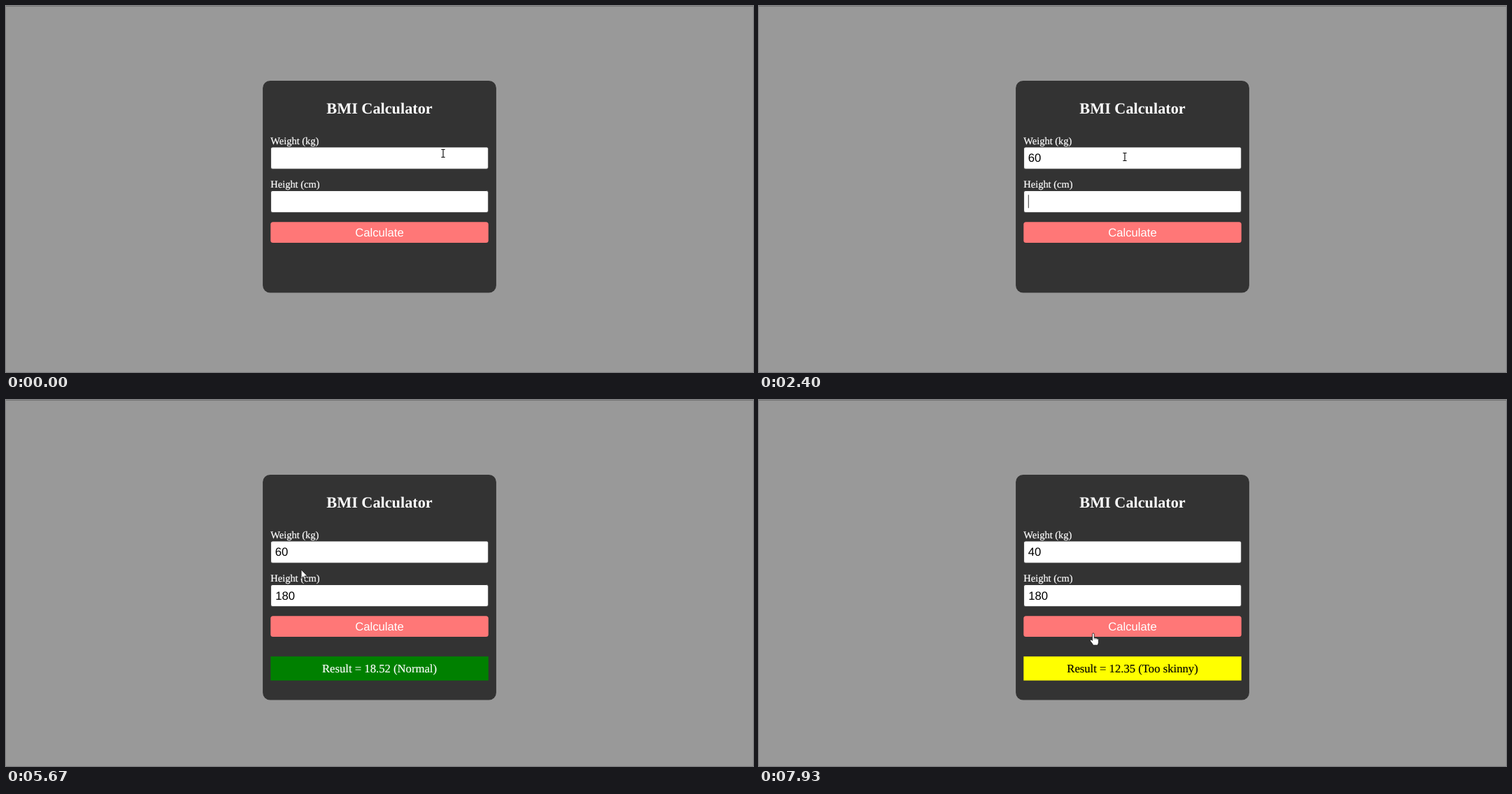
An HTML page for the animation above (8 s loop, 1068x524 px).

```html
<!DOCTYPE html>
<html lang="en">
<head>
<meta charset="utf-8">
<title>BMI Calculator</title>
<style>
  html, body { margin: 0; width: 100%; height: 100%; overflow: hidden; background: #999; }
  svg { display: block; width: 1068px; height: 524px; }
  text { text-rendering: geometricPrecision; white-space: pre; }
  .serif { font-family: "Liberation Serif", "Times New Roman", serif; fill: #fff; }
  .sans { font: 16.68px "Liberation Sans", Arial, sans-serif; }
  .title { font-size: 22.24px; font-weight: bold; }
  .label { font-size: 14.46px; stroke: #fff; stroke-width: .2px; }
  .result { font-size: 16.68px; stroke-width: .15px; }
  .item { font: 8.34px "Open Sans", "Noto Sans", sans-serif; fill: #555; }
  .mid { text-anchor: middle; }
</style>
</head>
<body>
<svg viewBox="0 0 1068 524">
  <defs>
    <g id="field">
      <rect x="378.3" y="-15.7" width="311.3" height="31.5" rx="3" fill="#767676"/>
      <path d="M378.7 14V-13q0-2.4 2.4-2.4H687" fill="none" stroke="#292929" stroke-width=".8"/>
      <rect x="379.1" y="-15.1" width="309.8" height="30.1" rx="2" fill="#fff"/>
    </g>
  </defs>
  <rect width="1068" height="524" fill="#999"/>
  <rect width="1068" height="1" fill="#777"/>
  <rect id="card" x="367.1" y="107" width="333.8" rx="10.5" fill="#333"/>
  <text class="serif title mid" x="534" y="153.8">BMI Calculator</text>
  <text class="serif label" x="378.3" y="198">Weight (kg)</text>
  <text class="serif label" x="378.3" y="260.3">Height (cm)</text>
  <use href="#field" y="217.7"/>
  <use href="#field" y="280"/>
  <rect id="mark" y="208" height="19" fill="#3297fd"/>
  <text id="weight" class="sans" x="384.8" y="223.3"></text>
  <text id="height" class="sans" x="385.3" y="285.6"></text>
  <rect id="caret" width="0.9" height="19" fill="#222"/>
  <rect x="378.3" y="309.3" width="311.4" height="29.8" rx="3.5" fill="#f77"/>
  <text class="sans mid" x="534" y="330" fill="#fff">Calculate</text>
  <g id="result">
    <rect id="band" x="378.3" y="367.2" width="311.4" height="34.4"/>
    <text id="verdict" class="serif result mid" x="534" y="390.2"></text>
  </g>
  <g id="popup">
    <path id="bubble" fill="#fff"/>
    <g id="items"></g>
  </g>
  <g id="cursor">
    <path id="beam" d="M-2.6-5.5h2L0-5 .6-5.5h2M0-5V5M-2.6 5.5h2L0 5 .6 5.5h2" fill="none" stroke="#000" stroke-width="1.1"/>
    <g id="hand" transform="scale(1.1)" fill="#fff" stroke="#111" stroke-width=".7" stroke-linejoin="round">
      <path d="M-1.3 9.5V1.1a1.2 1.2 0 0 1 2.4 0V5.7l4 .8q1.7.4 1.7 2.1v2.8q0 1.6-.8 3v1.1H-.7v-1.1l-3.2-4.3q-.7-1.1.2-1.7.9-.4 1.6.4z"/>
      <path d="M1.1 5.7v2.4M3.1 6.1v2M5 6.5v1.9" fill="none" stroke-width=".5"/>
    </g>
    <path id="arrow" d="M0 0V12.4L2.8 9.8 4.7 14.2 6.6 13.4 4.7 9.1H8.6Z" fill="#fff" stroke="#111" stroke-width=".7"/>
  </g>
</svg>
<script>
// All times are in ticks of 1/15 s.
const TICK = 1000 / 15, TICKS = 120, BLINK = 8;
const DIGIT = 9.28, TEXT_X = 385, ROW_Y = [217.5, 279.8];
const HISTORY = [["60", "23", "12", "80", "50", "500"], ["180", "170", "160", "150"]];

const moves = [ // from, to, x, y
  [0, 2, 561, 213], [3, 9, 522, 221], [14, 16, 523, 216], [62, 65, 554, 268],
  [66, 73, 471, 317], [79, 88, 405, 217], [90, 95, 382, 218],
  [100, 104, 471, 287], [104, 109, 479, 353], [109, 114, 478, 334]
];

// Focus, typing and blur; row is the focused field, open allows suggestions.
const type = (at, row, text) => ({ at, row, text, open: true });
const events = [
  { at: 0 },
  type(13, 0, ""), type(28, 0, "6"), type(32, 0, "60"),
  { at: 36, row: 1, text: "" },
  type(46, 1, "1"), type(54, 1, "18"), type(55, 1, "180"),
  { at: 73 },
  { at: 90, row: 0, text: "60", drag: true },
  type(106, 0, "4"), type(109, 0, "40"),
  { at: 116 }
];
const results = [75, 119];

const el = id => document.getElementById(id);
const show = (id, on) => el(id).style.display = on ? "" : "none";
const set = (id, attrs) => { for (const a in attrs) el(id).setAttribute(a, attrs[a]); };
const clamp = (v, lo, hi) => Math.min(hi, Math.max(lo, v));
const eventAt = k => events.filter(e => e.at <= k).pop() || events[0];
const textAt = (row, k) => (events.filter(e => e.at <= k && e.row === row).pop() || { text: "" }).text;

function pointer(k) {
  let x = 625, y = 211;
  for (const [from, to, x1, y1] of moves) {
    const u = clamp((k - from) / (to - from), 0, 1), s = u * u * (3 - 2 * u);
    x += (x1 - x) * s;
    y += (y1 - y) * s;
  }
  return [x, y];
}

function drawCursor(k) {
  const [x, y] = pointer(k);
  const beam = ROW_Y.some(r => Math.abs(y - r) < 16);
  const hand = y > 309 && y < 339;
  show("beam", beam);
  show("hand", hand);
  show("arrow", !beam && !hand);
  set("cursor", { transform: `translate(${x} ${y})` });
}

function drawFields(k) {
  const e = eventAt(k), weight = textAt(0, k);
  const dragged = (TEXT_X + weight.length * DIGIT - pointer(k)[0]) / DIGIT;
  const n = e.drag ? (k < 100 ? clamp(Math.round(dragged), 0, 2) : 2) : 0;
  const plain = weight.length - n;
  el("weight").innerHTML = weight.slice(0, plain) + `<tspan fill="#fff">${weight.slice(plain)}</tspan>`;
  el("height").textContent = textAt(1, k);
  set("mark", { x: TEXT_X + plain * DIGIT, width: n * DIGIT });

  const caret = e.row !== undefined && !n && (k - e.at) % (2 * BLINK) < BLINK;
  show("caret", caret);
  if (caret) set("caret", { x: TEXT_X + e.text.length * DIGIT - 0.2, y: ROW_Y[e.row] - 9.5 });
}

// Suggestions follow the text one tick late and fade once it is complete.
function drawPopup(k) {
  const now = eventAt(k), e = eventAt(k - 1);
  const list = now.open && e.open ? HISTORY[e.row].filter(s => s.startsWith(e.text)) : [];
  const done = list.length && HISTORY[now.row].includes(now.text);
  const alpha = done ? 1 - (k - now.at) / 2 : 1;
  show("popup", list.length && alpha > 0);
  if (!list.length) return;
  const top = ROW_Y[e.row] + 22.7, h = list.length * 25 + 6.5;
  const w = 28 + 4.75 * Math.max(...list.map(s => s.length));
  set("bubble", { d: `M449 ${top}H455L461.5 ${top - 5.5}L468 ${top}H${445 + w}q2 0 2 2v${h - 4}q0 2-2 2H449q-2 0-2-2V${top + 2}q0-2 2-2z` });
  el("items").innerHTML = list.map((s, i) =>
    `<text class="item" x="455" y="${top + 18.8 + i * 25}">${s}</text>`).join("");
  set("popup", { opacity: alpha });
}

function drawResult(k) {
  const at = results.filter(t => t <= k).pop();
  show("result", at);
  set("card", { height: at ? 322.5 : 303.5 });
  if (!at) return;
  const bmi = textAt(0, at) / (textAt(1, at) / 100) ** 2, thin = bmi < 18.5;
  const ink = thin ? "#000" : "#fff";
  el("verdict").textContent = `Result = ${bmi.toFixed(2)} (${thin ? "Too skinny" : "Normal"})`;
  el("verdict").style.fill = el("verdict").style.stroke = ink;
  set("band", { fill: thin ? "#ff0" : "#008000" });
}

function render(ms) {
  const k = Math.floor((ms + 3.5) / TICK) % TICKS;
  drawFields(k);
  drawResult(k);
  drawPopup(k);
  drawCursor(k);
}

const start = performance.now();
function loop() {
  render(performance.now() - start);
  requestAnimationFrame(loop);
}
loop();
</script>
</body>
</html>
```
